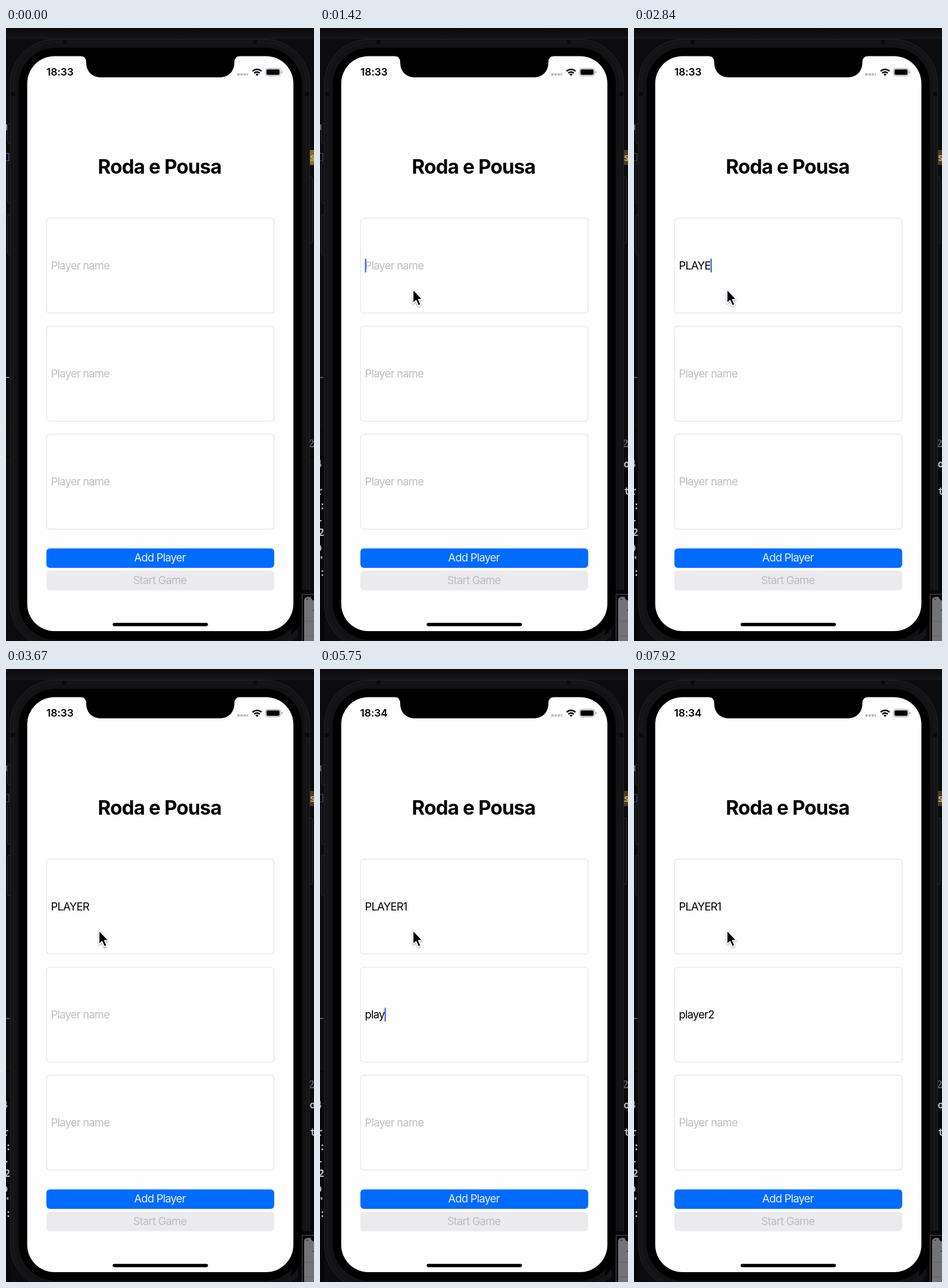
These frames come from a looping animation (530x1056 px, 8000 ms). An HTML page:

```html
<!DOCTYPE html>
<html lang="pt">
<head>
<meta charset="utf-8">
<title>Player setup</title>
<style>
  html, body { margin: 0; width: 100%; height: 100%; overflow: hidden; background: #0c0b0e; }
  svg { display: block; width: 530px; height: 1056px; }
  text { font-family: Inter, Roboto, sans-serif; font-size: 18.8px; letter-spacing: -.77px; white-space: pre; }
  .title { font-size: 34px; font-weight: 700; letter-spacing: -.85px; }
  .clock { font-size: 17.8px; font-weight: 600; letter-spacing: -.1px; }
  .code { font: 700 17px "Noto Sans Mono", "DejaVu Sans Mono", monospace; letter-spacing: 0; fill: #b4b3b7; }
  .mid { text-anchor: middle; }
</style>
</head>
<body>
<svg viewBox="0 0 530 1056" xmlns="http://www.w3.org/2000/svg">
  <defs>
    <linearGradient id="bar" x2="0" y2="1">
      <stop stop-color="#0b0a0d"/><stop offset="1" stop-color="#161518"/>
    </linearGradient>
    <filter id="shade" x="-50%" y="-50%" width="200%" height="200%">
      <feDropShadow dx="0" dy="1.5" stdDeviation="1.4" flood-opacity=".38"/>
    </filter>
  </defs>

  <!-- desktop behind the phone -->
  <rect width="530" height="1056" fill="#0c0b0e"/>
  <rect y="2" width="530" height="17" fill="url(#bar)"/>
  <path d="M0 693.5H8M0 738.5H8M522 738.5H530" stroke="#000"/>
  <path d="M0 602H6" id="rule" stroke="#a5a4a8" stroke-width="1.6"/>
  <g id="idle">
    <rect y="166" width="2.5" height="10" fill="#929195"/>
    <rect x="523" y="210" width="7" height="26" fill="#84702a"/>
    <path d="M0 216H5V229H0" fill="none" stroke="#574f83" stroke-width="1.6"/>
  </g>
  <g id="active">
    <rect y="739" width="8" height="317" fill="#070609"/>
    <rect x="522" y="739" width="8" height="230" fill="#070609"/>
    <rect y="166" width="2" height="10" fill="#66656a"/>
    <rect x="523" y="210" width="7" height="26" fill="#493e23"/>
    <path d="M0 216H5V229H0" fill="none" stroke="#3d385e" stroke-width="1.6"/>
    <g id="code"></g>
  </g>
  <text class="code" x="522.5" y="229" style="fill:#b5a96f">s</text>
  <text x="520.5" y="722" fill="#77767a" style="font-family:'Noto Serif',serif">2</text>

  <!-- phone body -->
  <g fill="#111013" stroke="#29282b">
    <rect x="2.5" y="164.5" width="7" height="34" rx="2"/>
    <rect x="2.5" y="232.5" width="7" height="69" rx="2"/>
    <rect x="2.5" y="321.5" width="7" height="69" rx="2"/>
    <rect x="520.5" y="256.5" width="7" height="114" rx="2"/>
  </g>
  <rect x="7.5" y="19.5" width="515" height="1049" rx="76" fill="#141316" stroke="#222124"/>
  <rect x="13.5" y="25.5" width="503" height="1037" rx="71" fill="#121114" stroke="#1a191c"/>
  <path d="M97 20h7v7h-7zM425 20h7v7h-7zM8 110h7v7H8zM515 110h7v7h-7z" fill="#09080b"/>
  <rect x="22" y="34" width="487" height="1020" rx="64" fill="#000"/>
  <rect x="36.5" y="48.5" width="458" height="990.5" rx="47" fill="#fefdff"/>
  <path d="M129 47.5V48.5Q138 49 138 59C138 75 148 85 164 85H367C383 85 393 75 393 59Q393 49 402 48.5V47.5Z"/>

  <!-- window peeking in at the corner -->
  <rect x="502" y="968" width="28" height="88" fill="#08070a"/>
  <path d="M502 968H509V1019Q502 1037 490 1046Z" fill="#000"/>
  <path d="M509.5 1056V975.5H530" fill="#0a090c" stroke="#514f53"/>
  <path d="M513 1056V987Q513 980 520 980H530V1056Z" fill="#737276"/>
  <path d="M524 980Q526 986 530 986V980Z" fill="#08070a"/>
  <path d="M517 984H520M528 1003H530" stroke="#27262a" stroke-width="1.5"/>
  <path d="M514 1022H530M514 1047H530" stroke="#616064"/>

  <!-- status bar -->
  <text class="clock" id="clock" x="69.5" y="82.3"></text>
  <path d="M399.6 80H418" stroke="#b9b8bc" stroke-width="3.8" stroke-dasharray="4 1.4" transform="translate(-1.6)"/>
  <g fill="none" stroke="#000" stroke-width="2.6">
    <path d="M424.3 74.4A11 11 0 0 1 439.7 74.4"/>
    <path d="M427.4 77.7A6.6 6.6 0 0 1 436.6 77.7"/>
  </g>
  <path d="M432 82.6L429.3 79.9A4 4 0 0 1 434.7 79.9Z"/>
  <rect x="446.5" y="69.5" width="26" height="13" rx="4" fill="none" stroke="#98979b"/>
  <rect x="448.2" y="71.2" width="22.6" height="9.6" rx="2.4"/>
  <path d="M474 73.8Q475.8 74.6 475.8 76T474 78.4Z" fill="#98979b"/>

  <!-- form -->
  <text class="title mid" x="264.4" y="251">Roda e Pousa</text>
  <g id="form"></g>
  <rect x="69.5" y="896.5" width="392" height="33.5" rx="6" fill="#006bff"/>
  <text class="mid" x="264.8" y="919.4" fill="#e8f1ff">Add Player</text>
  <rect x="69.5" y="935" width="392" height="33.5" rx="6" fill="#ebeaed"/>
  <text class="mid" x="264.8" y="958.4" fill="#bdbcc0">Start Game</text>
  <rect x="183.5" y="1024.8" width="164" height="5.6" rx="2.8"/>

  <rect id="caret" width="2.2" height="24" rx="1" fill="#3168d8"/>
  <path id="mouse" d="M0 0V23.6L5.3 18.7L9.2 27.6L13.2 25.8L9.4 17.1H16.2Z" transform="translate(159 449)"
        stroke="#fff" stroke-width="1.5" stroke-linejoin="round" filter="url(#shade)"/>
</svg>

<script>
const LOOP = 8000, BLINK = 500;
const CLICK = 1170, MINUTE = 4250;
const HINT = 'Player name';
const fieldTops = [327.5, 513.7, 699.7];

// [time, focused field, its text]
const keys = [
  [CLICK, 0, ''],
  [1750, 0, 'P'], [2000, 0, 'PL'], [2340, 0, 'PLA'], [2590, 0, 'PLAY'],
  [2840, 0, 'PLAYE'], [3090, 0, 'PLAYER'], [3920, 0, 'PLAYER1'],
  [4330, 1, ''],
  [5000, 1, 'p'], [5170, 1, 'pl'], [5340, 1, 'pla'], [5590, 1, 'play'],
  [5840, 1, 'playe'], [6090, 1, 'player'], [6420, 1, 'player2']
];

// [time, x, y] of the pointer tip
const path = [
  [170, 250, 940], [250, 238, 800], [330, 222, 640],
  [420, 175, 512], [500, 162, 460], [590, 160, 450]
];

const codeBits = [
  [-7, 757, '4:'], [-6, 804, 'r('], [-1, 829, ':'], [-5, 854, '-'], [-3, 875, '2'],
  [-7, 901, 'p:'], [-4, 923, '"'], [-1, 944, ':'], [522.5, 757, 'o'], [523, 804, 't']
];

const $ = id => document.getElementById(id);

function add(parent, tag, attrs, text = '') {
  const el = document.createElementNS('http://www.w3.org/2000/svg', tag);
  for (const name in attrs) el.setAttribute(name, attrs[name]);
  el.textContent = text;
  return parent.appendChild(el);
}

// Clips the code at the left to the strip beside the phone.
for (const [x, y, text] of codeBits) add($('code'), 'text', { class: 'code', x, y }, text);

const labels = fieldTops.map(y => {
  add($('form'), 'rect', { x: 69.8, y, width: 391.4, height: 163.5, rx: 5.5, fill: 'none', stroke: '#e1e0e6', 'stroke-width': 1.1 });
  return add($('form'), 'text', { x: 77.3, y: y + 88.6 });
});

const last = (table, t) => table.filter(row => row[0] <= t).pop();
const show = (el, on) => el.setAttribute('visibility', on ? 'visible' : 'hidden');

function draw(t) {
  const active = t >= CLICK;
  show($('active'), active);
  show($('idle'), !active);
  $('rule').setAttribute('stroke', active ? '#69686c' : '#a5a4a8');

  const late = t >= MINUTE;
  $('clock').textContent = late ? '18:34' : '18:33';
  $('clock').setAttribute('x', late ? 69 : 69.5);

  const values = ['', '', ''];
  for (const [time, field, text] of keys) if (time <= t) values[field] = text;
  labels.forEach((label, i) => {
    label.textContent = values[i] || HINT;
    label.setAttribute('fill', values[i] ? '#000' : '#bfbec3');
  });

  const key = last(keys, t);
  show($('caret'), key && (t - key[0]) % (2 * BLINK) < BLINK);
  if (key) {
    const [, field, text] = key;
    const width = text ? labels[field].getComputedTextLength() : 0;
    $('caret').setAttribute('x', 77.3 + width);
    $('caret').setAttribute('y', fieldTops[field] + 69.8);
  }

  const spot = last(path, t);
  show($('mouse'), spot);
  if (spot) $('mouse').setAttribute('transform', `translate(${spot[1]} ${spot[2] + .5})`);
}

function tick() {
  draw(performance.now() % LOOP);
  requestAnimationFrame(tick);
}
tick();
</script>
</body>
</html>
```
